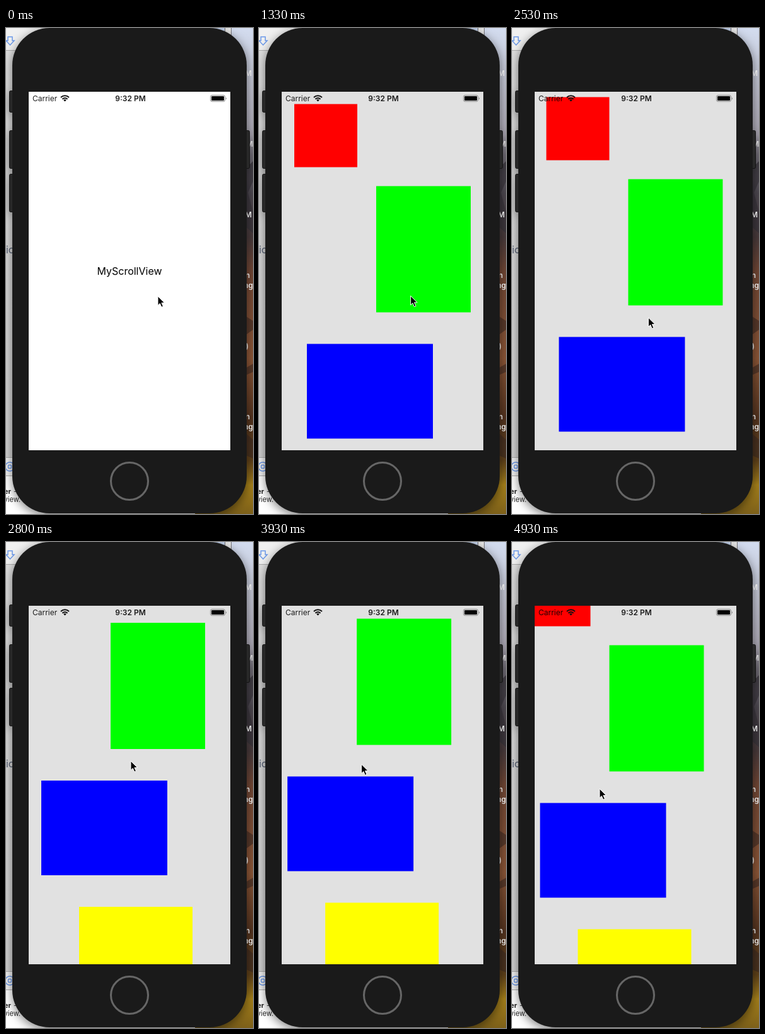
Recreate the animation shown at these times as an HTML page. Size 392 px wide and 770 px high, loop 4990 ms.

```html
<!DOCTYPE html>
<html lang="en">
<head>
<meta charset="utf-8">
<title>Scroll view demo</title>
<style>
  html, body { margin: 0; width: 100%; height: 100%; overflow: hidden; }
  svg { display: block; width: 392px; height: 770px; font-family: Inter, "Liberation Sans", sans-serif; }
  #phone { filter: drop-shadow(0 4px 8px rgba(0, 0, 0, .5)); }
</style>
</head>
<body>
<svg viewBox="0 0 392 770">
  <defs>
    <linearGradient id="photo" x1="0" y1="0" x2="0" y2="1">
      <stop offset="0" stop-color="#d3dcef"/>
      <stop offset=".1" stop-color="#c2c5d3"/>
      <stop offset=".22" stop-color="#aaa6b2"/>
      <stop offset=".26" stop-color="#77737d"/>
      <stop offset=".34" stop-color="#4b464e"/>
      <stop offset=".43" stop-color="#47393a"/>
      <stop offset=".5" stop-color="#704634"/>
      <stop offset=".68" stop-color="#8a5536"/>
      <stop offset=".8" stop-color="#53331f"/>
      <stop offset=".89" stop-color="#5e4019"/>
      <stop offset=".94" stop-color="#a5801a"/>
      <stop offset="1" stop-color="#7d601a"/>
    </linearGradient>
    <linearGradient id="pane" x1="0" y1="0" x2="0" y2="1">
      <stop offset="0" stop-color="#dedede"/>
      <stop offset="1" stop-color="#cfcfcf"/>
    </linearGradient>
    <clipPath id="screen"><path d="M36 101h320v568H36z"/></clipPath>
  </defs>

  <!-- desktop photo -->
  <path fill="url(#photo)" d="M300 0h92v770h-92z"/>
  <path fill="#37323a" opacity=".7" d="M378 225l14-14v32l-8 18 8 30v34l-14-12z"/>
  <path fill="#3b2822" opacity=".6" d="M378 455l14 9v14l-14 10zM378 540l14-8v13l-14 6zM378 640l14 12v30l-14-6z"/>
  <g fill="#fff" font-size="12" font-weight="600" text-anchor="end">
    <text x="390" y="76">M</text>
    <text x="392" y="188">M</text>
    <text x="390" y="300">M</text>
    <text x="387" y="396">n</text>
    <text x="392" y="412">ng</text>
    <text x="385" y="508">)</text>
    <text x="387" y="620">n</text>
    <text x="392" y="636">ng</text>
  </g>

  <!-- window behind the phone -->
  <path fill="url(#pane)" d="M0 0h120v770H0z"/>
  <path fill="#f0f0f0" d="M0 0h348v35H0z"/>
  <path fill="#c8d7f0" d="M300 0h47v5h-47z"/>
  <path fill="#e9e9e9" d="M348 0h9v60h-9z"/>
  <path fill="#77757a" d="M347 0h1v60h-1zM357 0h1v60h-1z"/>
  <path fill="#f1f1f1" d="M0 681h60v28H0z"/>
  <path fill="#fff" d="M0 710h120v60H0z"/>
  <path stroke="#aaa" d="M0 35.5h40M0 680.5h30M0 709.5h60"/>
  <g fill="none" stroke="#6b98e8" stroke-width="1.5">
    <path d="M3 14h7v6h3l-6.500 7-6.500-7h3z"/>
    <circle cx="6" cy="695" r="7"/>
    <rect x="3.500" y="692.500" width="5" height="5" rx="1"/>
  </g>
  <text x="13" y="357" font-size="16" fill="#566074" text-anchor="end">lic</text>

  <g id="phone">
    <g fill="#292929" stroke="#111">
      <rect x="5.500" y="99.500" width="10" height="34" rx="2"/>
      <rect x="5.500" y="162.500" width="10" height="60" rx="2"/>
      <rect x="5.500" y="231.500" width="10" height="60" rx="2"/>
      <rect x="376.500" y="162.500" width="10" height="60" rx="2"/>
    </g>
    <rect x="10" y="0" width="372" height="769" rx="59" fill="#1a1a1a"/>
  </g>
  <g font-size="11" fill="#222">
    <text x="8" y="738" font-weight="700" text-anchor="end">er</text>
    <text x="12" y="738">-</text>
    <text x="23" y="751" text-anchor="end">view.</text>
  </g>
  <circle cx="196" cy="718" r="29.500" fill="none" stroke="#666" stroke-width="3"/>

  <g clip-path="url(#screen)">
    <path fill="#fff" d="M36 101h320v568H36z"/>
    <text x="196" y="391" font-size="16" text-anchor="middle">MyScrollView</text>
    <g id="app">
      <path fill="#e1e1e1" d="M36 101h320v568H36z"/>
      <g id="content">
        <path fill="#f00" d="M56 120.500h100v100H56z"/>
        <path fill="#0f0" d="M186 250.500h150v200H186z"/>
        <path fill="#00f" d="M76 500.500h200v150H76z"/>
        <path fill="#ff0" d="M136 700.500h180v150H136z"/>
      </g>
    </g>
    <g font-size="12" fill-opacity=".88">
      <text x="42" y="115.500">Carrier</text>
      <text x="197.500" y="115.500" font-weight="600" text-anchor="middle">9:32 PM</text>
    </g>
    <path fill="none" stroke="#111" stroke-width="2" d="M87 110a9.200 9.200 0 0 1 13 0M89.500 112.700a5.600 5.600 0 0 1 8 0"/>
    <path fill="#111" d="M91.300 114.200a3.100 3.100 0 0 1 4.400 0l-2.200 2.300z"/>
    <rect x="324.500" y="106.500" width="23" height="10" rx="2.500" fill="none" stroke="#888"/>
    <rect x="326" y="108" width="20" height="7" rx="1"/>
    <path fill="#777" d="M349 109.500q1.800 2 0 4z"/>
  </g>

  <path id="cursor" stroke="#fff" stroke-width="1" d="M0 0v14.500l3.300-3.100 2.500 5.800 2.600-1.100-2.500-5.600h4.700z"/>
</svg>
<script>
  const LOOP = 4990, FPS = 15;
  // time, cursor x, cursor y, content x, content y
  const keys = [
    [0, 241, 425, 0, 0],
    [1300, 241, 425, 0, 0],
    [1930, 195, 349, 0, 0],
    [2070, 195, 349, 0, 0],
    [2450, 218, 470, 0, 0],
    [2670, 210, 415, -8, -55],
    [2800, 198, 347, -20, -122.5],
    [2920, 191, 318, -27, -152],
    [3300, 221, 486, 0, 0],
    [3533, 213, 397, -8, -89],
    [3780, 176, 345, -29, -137],
    [4400, 138, 392, -33.5, -84],
    [4933, 139, 391, -31.5, -87],
    [LOOP, 139, 391, -31.5, -87]
  ];
  const el = id => document.getElementById(id);
  const app = el("app"), content = el("content"), cursor = el("cursor");
  const clamp = v => Math.max(0, Math.min(1, v));
  const move = (node, x, y) => node.setAttribute("transform", `translate(${x} ${y})`);

  // Slope of channel n at key i: flat at turning points, flowing elsewhere.
  function slope(i, n) {
    if (i === 0 || i === keys.length - 1) return 0;
    const [p, k, q] = keys.slice(i - 1, i + 2);
    const before = (k[n] - p[n]) / (k[0] - p[0]);
    const after = (q[n] - k[n]) / (q[0] - k[0]);
    return before * after > 0 ? 2 * before * after / (before + after) : 0;
  }

  function pose(t) {
    const i = keys.findIndex(k => k[0] > t);
    const a = keys[i - 1], b = keys[i];
    const span = b[0] - a[0], u = (t - a[0]) / span, w = 1 - u;
    return a.map((v, n) =>
      v * w * w * (1 + 2 * u) + b[n] * u * u * (3 - 2 * u) +
      span * u * w * (slope(i - 1, n) * w - slope(i, n) * u));
  }

  const start = performance.now();
  function draw() {
    const now = (performance.now() - start) % LOOP;
    // Step like a 15 fps screen recording.
    const t = Math.floor((now + 5) * FPS / 1000) * 1000 / FPS;
    const [, cx, cy, x, y] = pose(t);
    app.setAttribute("opacity", clamp((t - 897) / 315));
    move(content, x, y);
    move(cursor, cx, cy);
    requestAnimationFrame(draw);
  }
  draw();
</script>
</body>
</html>
```
